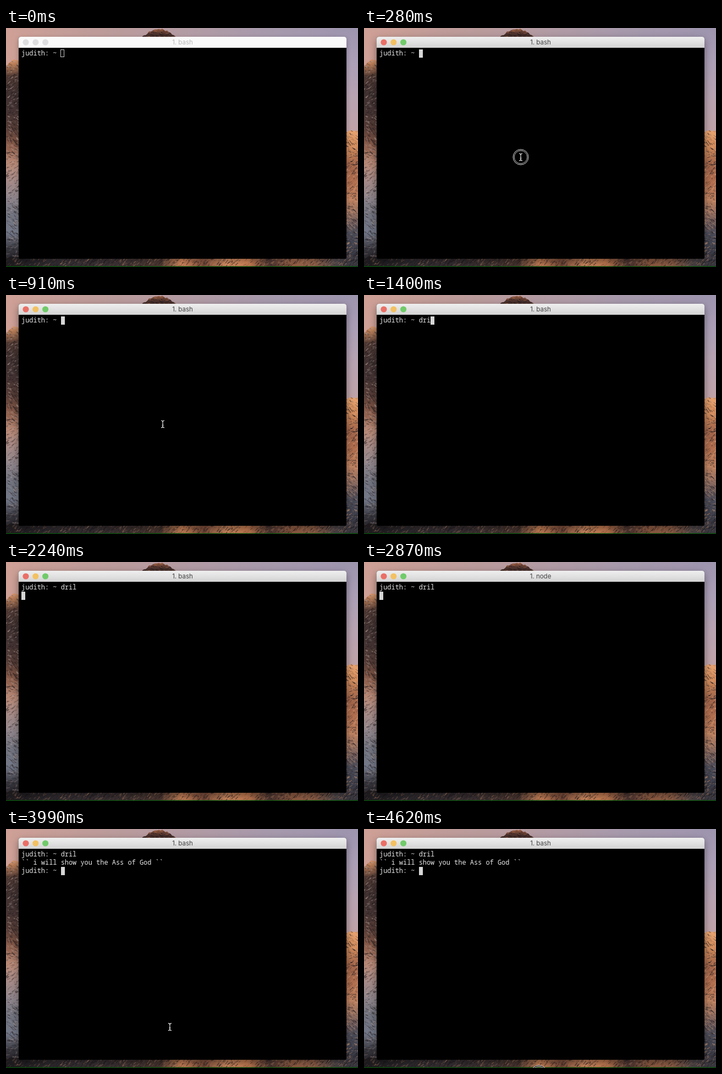
Animation of 640x435 px, one loop 4690 ms. Source, as an HTML page with a canvas:

```html
<!DOCTYPE html>
<html lang="en">
<head>
<meta charset="utf-8">
<title>Terminal</title>
<style>
html, body { margin: 0; width: 100%; height: 100%; overflow: hidden; background: #000; }
canvas { display: block; width: 640px; height: 435px; }
</style>
</head>
<body>
<canvas id="stage" width="640" height="435"></canvas>
<script>
const W = 640, H = 435, LOOP = 4690, STEP = 70;
const ctx = document.getElementById('stage').getContext('2d');
const MONO = '500 11.95px "Noto Sans Mono", "DejaVu Sans Mono", monospace';
const CELL = 7.17, LEFT = 28, LINE = 15;
const PROMPT = 'judith: ~ ';
const REPLY = '`` i will show you the Ass of God ``';
const KEYS = [1190, 1260, 1400, 1470];
const FOCUS = 280, ENTER = 2100, OUTPUT = 3080;
const HOME = { x: 285, y: 235 }, EXIT = { x: 318, y: 444 };

let seed = 17;
function rand() {
  seed = (seed * 16807) % 2147483647;
  return seed / 2147483647;
}

// Gradient with evenly spaced colours
function fade(c, x0, y0, x1, y1, colors) {
  const g = c.createLinearGradient(x0, y0, x1, y1);
  colors.forEach((color, i) => g.addColorStop(i / (colors.length - 1), color));
  return g;
}

// Jagged ridge, shaded by a gradient and broken up by shadow and light flecks
function mountain(c, x, y, w, rise, fill, glint, bottom = H) {
  c.save();
  c.beginPath();
  c.moveTo(x, bottom);
  for (let dx = 0; dx <= w; dx += 3) {
    c.lineTo(x + dx, y + rise * (1 - Math.sin(Math.PI * dx / w)) + rand() * 3);
  }
  c.lineTo(x + w, bottom);
  c.clip();
  c.fillStyle = fill;
  c.fillRect(x, y, w, bottom - y);

  const count = w * (bottom - y) / 11;
  for (let i = 0; i < count; i++) {
    const px = x + rand() * w, py = y + rand() * (bottom - y);
    const len = 1 + rand() * 5, tilt = Math.sin(py / 25) + rand() - 0.5;
    c.strokeStyle = rand() < 0.6 ? '#1d181c' : glint;
    c.globalAlpha = 0.15 + rand() * 0.45;
    c.lineWidth = 0.5 + rand() * 1.3;
    c.beginPath();
    c.moveTo(px, py);
    c.lineTo(px + len, py + len * tilt);
    c.stroke();
  }
  c.restore();
}

function makeBackdrop() {
  const layer = document.createElement('canvas');
  layer.width = W;
  layer.height = H;
  const c = layer.getContext('2d');
  c.fillStyle = fade(c, 0, 0, W, 0, ['#cfa096', '#bd9b99', '#b39ba3', '#a699ac', '#9d94ae']);
  c.fillRect(0, 0, W, H);
  c.fillStyle = fade(c, 0, 0, 0, 190, ['#9d94ae', '#ab9fb6', '#b8a3b1', '#c0a3a8']);
  c.fillRect(600, 0, 40, 200);

  const peak = fade(c, 0, 1, 0, 17, ['#a96748', '#53352e', '#3b2927']);
  mountain(c, 248, 0, 60, 15, peak, '#a9684a', 20);

  const west = fade(c, 0, 58, 0, H, ['#dc9464', '#4c3732', '#3f3130', '#453433', '#573d37',
    '#8c5d4a', '#b98a77', '#a58a87', '#8e858c', '#70737f', '#737888', '#35343b', '#1e1c20']);
  mountain(c, 0, 56, 36, 12, west, '#b09a94');

  const east = fade(c, 0, 186, 0, H, ['#eaa571', '#cf8859', '#a0644a', '#ae6c4d',
    '#c08260', '#8c6b60', '#4c4d5a', '#3d3e4a', '#2c2b33']);
  mountain(c, 612, 184, 36, 9, east, '#d9a27c');

  const hills = fade(c, 0, 0, W, 0, ['#1c1a1d', '#242125', '#302c30', '#352f33', '#373034',
    '#3a3032', '#3f3230', '#4a3630', '#d0865a', '#7a4a38', '#d08b60', '#c67b50', '#4a3430',
    '#965f44', '#8c5c45', '#4a4448', '#35353f']);
  mountain(c, 0, 415, W, 0, hills, '#a77a60');
  c.fillStyle = '#064909';
  c.fillRect(0, 433.5, W, 1.5);
  return layer;
}

const backdrop = makeBackdrop();

function circle(x, y, r, color, width) {
  ctx.beginPath();
  ctx.arc(x, y, r, 0, Math.PI * 2);
  ctx.strokeStyle = ctx.fillStyle = color;
  ctx.lineWidth = width;
  if (width) ctx.stroke();
  else ctx.fill();
}

function drawWindow(active, title) {
  ctx.save();
  ctx.shadowColor = active ? 'rgba(0,0,0,.42)' : 'rgba(0,0,0,.28)';
  ctx.shadowBlur = active ? 14 : 8;
  ctx.shadowOffsetY = active ? 5 : 3;
  ctx.fillStyle = '#000';
  ctx.beginPath();
  ctx.roundRect(23, 16, 596, 404, [4, 4, 2, 2]);
  ctx.fill();
  ctx.restore();

  ctx.fillStyle = active ? fade(ctx, 0, 16, 0, 36, ['#efefef', '#d3d3d3']) : '#fafafa';
  ctx.beginPath();
  ctx.roundRect(23, 16, 596, 20, [4, 4, 0, 0]);
  ctx.fill();

  const lights = active ? ['#ea6f66', '#f3c162', '#70cb69'] : Array(3).fill('#dedee0');
  lights.forEach((color, i) => circle(36 + i * 17.8, 26, 5.6, color));

  ctx.font = '11.5px Inter, "Open Sans", sans-serif';
  ctx.textAlign = 'center';
  ctx.fillStyle = active ? '#444' : '#b9b9b9';
  ctx.fillText(title, 321, 30.2);
}

function drawTerminal(t, active) {
  const typed = 'dril'.slice(0, KEYS.filter(k => t >= k).length);
  const lines = [PROMPT + typed];
  if (t >= OUTPUT) lines.push(REPLY, PROMPT);
  else if (t >= ENTER) lines.push('');

  ctx.font = MONO;
  ctx.textAlign = 'left';
  ctx.fillStyle = '#e6e6e6';
  lines.forEach((line, i) => ctx.fillText(line, LEFT, 50 + i * LINE));

  const row = lines.length - 1;
  const x = Math.round(LEFT + lines[row].length * CELL), y = 39 + row * LINE;
  if (active) {
    ctx.fillStyle = '#d6d6d6';
    ctx.fillRect(x, y, 7, 15);
  } else {
    ctx.strokeStyle = '#c8c8c8';
    ctx.lineWidth = 1;
    ctx.strokeRect(x - 0.5, y + 0.5, 6, 13);
  }
}

function between(a, b, ux, uy) {
  return { x: a.x + (b.x - a.x) * ux, y: a.y + (b.y - a.y) * uy };
}

function pointerAt(t) {
  if (t < KEYS[0]) {
    const u = 1 - Math.pow(1 - Math.min(1, t / FOCUS), 2);
    return between(EXIT, HOME, u, u);
  }
  if (t < 3710) return null;
  const u = Math.min(1, (t - 3640) / 560);
  return between(HOME, EXIT, u * u, Math.pow(u, 1.09));
}

function beam({ x, y }) {
  ctx.beginPath();
  for (const s of [-1, 1]) {
    ctx.moveTo(x - 3, y + 6.5 * s);
    ctx.quadraticCurveTo(x, y + 6.5 * s, x, y + 4 * s);
    ctx.quadraticCurveTo(x, y + 6.5 * s, x + 3, y + 6.5 * s);
  }
  ctx.moveTo(x, y - 5);
  ctx.lineTo(x, y + 5);
  ctx.moveTo(x - 1.5, y + 2);
  ctx.lineTo(x + 1.5, y + 2);
  ctx.strokeStyle = '#e8e8e8';
  ctx.lineWidth = 1.2;
  ctx.stroke();
}

function ring({ x, y }) {
  circle(x, y, 13, '#111', 2);
  circle(x, y, 14, '#d0d0d0', 1);
  circle(x, y, 11.8, '#bdbdbd', 1);
}

function draw(now) {
  const t = Math.floor((now % LOOP) / STEP) * STEP;
  const active = t >= FOCUS;
  ctx.drawImage(backdrop, 0, 0);
  drawWindow(active, t >= 2380 && t < 3570 ? '1. node' : '1. bash');
  drawTerminal(t, active);

  const pos = pointerAt(t);
  if (!pos) return;
  if ((t >= FOCUS && t < 490) || t >= 4480) ring(pos);
  beam(pos);
}

const start = performance.now();
function tick() {
  draw(performance.now() - start);
  requestAnimationFrame(tick);
}
tick();
</script>
</body>
</html>
```
